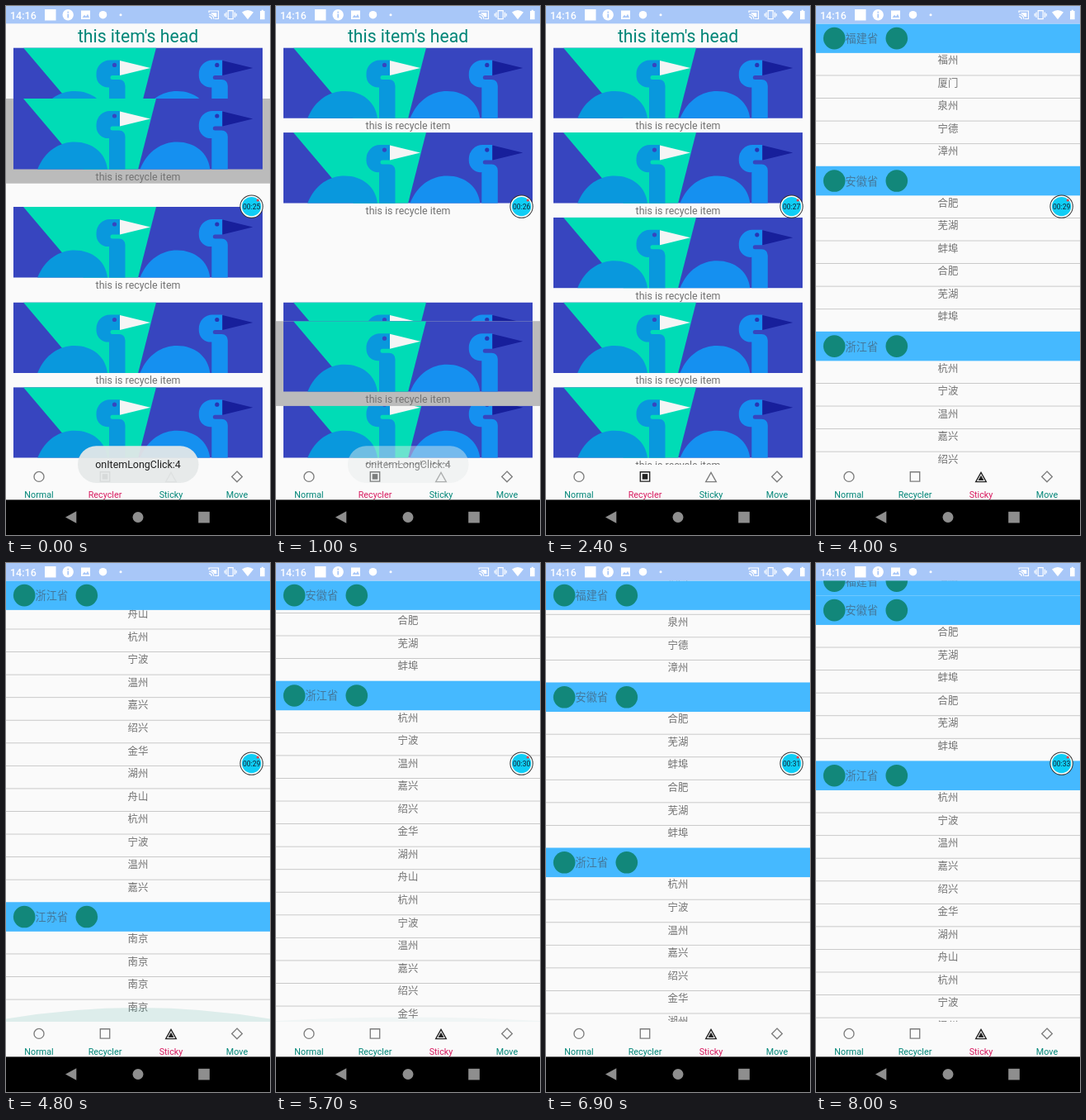
Animation of 320 by 640 pixels, one loop 8.1 s. Source, as an HTML page with a canvas:

```html
<!DOCTYPE html>
<html lang="en">
<head>
<meta charset="utf-8">
<style>
  html, body { margin: 0; width: 100%; height: 100%; overflow: hidden; background: #fafafa; }
  canvas { display: block; width: 320px; height: 640px; }
</style>
</head>
<body>
<canvas id="stage"></canvas>
<script>
const LOOP = 8100, SWITCH = 3200;
const TOP = 21.3, BOTTOM = 555, HEADER = 35.56, ROW = 27.56, RULE = 0.89, SLOT = 102.7;
const TEAL = '#008577', PINK = '#d81b60', GREY = '#737373', PAPER = '#fafafa';

const canvas = document.getElementById('stage');
const c = canvas.getContext('2d');
const dpr = window.devicePixelRatio || 1;
canvas.width = 320 * dpr;
canvas.height = 640 * dpr;

const clamp = v => Math.max(0, Math.min(1, v));
const ease = v => (1 - Math.cos(Math.PI * clamp(v))) / 2;
const slotY = i => 50.4 + i * SLOT;

// Smooth curve through [time, value] points, flat at turning points.
function curve(points, t) {
  const n = points.length - 1;
  if (t <= points[0][0]) return points[0][1];
  if (t >= points[n][0]) return points[n][1];
  const i = points.findIndex(p => p[0] > t) - 1;
  const slope = k => (points[k + 1][1] - points[k][1]) / (points[k + 1][0] - points[k][0]);
  const tangent = k => {
    if (k === 0 || k === n) return 0;
    const a = slope(k - 1), b = slope(k);
    return a * b <= 0 ? 0 : 2 * a * b / (a + b);
  };
  const [t0, a] = points[i], [t1, b] = points[i + 1];
  const d = t1 - t0, u = (t - t0) / d, u2 = u * u, u3 = u2 * u;
  return a + (b - a) * (3 * u2 - 2 * u3)
    + d * (tangent(i) * (u3 - 2 * u2 + u) + tangent(i + 1) * (u3 - u2));
}

function box(x, y, w, h, color) {
  c.fillStyle = color;
  c.fillRect(x, y, w, h);
}

function disc(x, y, r, color) {
  c.fillStyle = color;
  c.beginPath();
  c.arc(x, y, r, 0, 7);
  c.fill();
}

function shape(path, color) {
  c.fillStyle = color;
  c.fill(new Path2D(path));
}

function line(path, color, width) {
  c.strokeStyle = color;
  c.lineWidth = width;
  c.stroke(new Path2D(path));
}

function text(str, x, y, size, color, align = 'center', weight = 400) {
  c.font = `${weight} ${size}px Roboto, "Noto Sans CJK SC", "Noto Sans CJK", sans-serif`;
  c.textAlign = align;
  c.fillStyle = color;
  c.fillText(str, x, y);
}

function clipped(x, y, w, h, draw) {
  c.save();
  c.beginPath();
  c.rect(x, y, w, h);
  c.clip();
  draw();
  c.restore();
}

// ---- Recycler page ----

function bird(color, beak, eye) {
  shape('M29 86C38 63 56 52.5 74 52.5C96 52.5 112 66 114 86Z', color);
  shape('M129 15H117A16.5 16.5 0 0 0 100.5 31.5V34A14 14 0 0 0 116 48V86H135.5V46Q135 38.5 128 38.5H120A2.5 2.5 0 0 1 120 33.5H129Z', color);
  shape('M129 15.5L166 24.5L129 33.5Z', beak);
  disc(122.5, 21, 2.6, eye);
}

function card(y, lifted) {
  if (lifted) box(0, y, 320, SLOT, '#bbb');
  clipped(9, y, 302, 85.4, () => {
    c.translate(9, y);
    box(0, 0, 302, 86, '#3745bf');
    shape('M12 0H173L151 86H85Z', '#00dcb6');
    bird('#0998dd', '#f5f5f5', '#3745bf');
    c.translate(124.3, 0);
    bird('#1590f0', '#171f9b', '#2836b4');
  });
  text('this is recycle item', 160, y + 98.7, 12.44, GREY);
}

const DRAG = [[0, 112], [150, 110], [350, 130], [660, 256], [1000, 381],
  [1400, 438], [1900, 441], [2250, slotY(3)]];

function recyclerPage(t) {
  text("this item's head", 160, 44.3, 21.2, TEAL);
  const second = t < 400
    ? 243 + (slotY(2) - 243) * ease(t / 120)
    : slotY(2) - SLOT * ease((t - 660) / 250);
  const third = slotY(3) - SLOT * ease((t - 1000) / 250);
  [slotY(0), second, third, slotY(4)].forEach(y => card(y, false));
  card(curve(DRAG, t), t < 2300);
}

// ---- Sticky page ----

const cycle = (names, n) => Array.from({ length: n }, (_, i) => names[i % names.length]);
const GROUPS = [
  ['福建省', cycle(['福州', '厦门', '泉州', '宁德', '漳州'], 5)],
  ['安徽省', cycle(['合肥', '芜湖', '蚌埠'], 6)],
  ['浙江省', cycle(['杭州', '宁波', '温州', '嘉兴', '绍兴', '金华', '湖州', '舟山'], 20)],
  ['江苏省', cycle(['南京'], 4)]
];
const SCROLL = [[4150, 0], [4400, 210], [4700, 569.4], [5080, 569.4], [5700, 251.5],
  [6250, 94], [6700, 40], [6900, 49.2], [7200, 118], [7500, 154.4]];
const GLOW = [[4620, 0], [4780, 17], [4850, 17], [5300, 10], [5700, 5.5], [5950, 0]];

function groupHeader(name, y) {
  box(0, y, 320, HEADER, '#45b9ff');
  disc(22.2, y + 17.8, 13.3, '#12877a');
  disc(97.8, y + 17.8, 13.3, '#12877a');
  text(name, 35.6, y + 22.8, 13.2, '#44789b', 'left');
}

function stickyPage(t) {
  let y = TOP - curve(SCROLL, t);
  const heads = [];
  for (const [name, rows] of GROUPS) {
    heads.push([name, y]);
    y += HEADER;
    rows.forEach((city, i) => {
      const top = y + i * ROW;
      text(city, 160, top + 13.3, 12.44, GREY);
      if (i > 0) box(0, top - RULE, 320, RULE, '#c4c4c4');
    });
    y += rows.length * ROW - RULE;
  }
  heads.forEach(([name, top], i) => {
    const next = i + 1 < heads.length ? heads[i + 1][1] : y;
    groupHeader(name, Math.min(Math.max(top, TOP), Math.max(top, next - HEADER)));
  });
  const h = curve(GLOW, t);
  if (h > 0) {
    const edge = BOTTOM - h * 0.2;
    shape(`M0 ${BOTTOM}V${edge}Q160 ${BOTTOM - h * 1.8} 320 ${edge}V${BOTTOM}Z`,
      `rgba(0,133,119,${0.007 * h})`);
  }
}

// ---- Surroundings ----

function statusBar() {
  const white = '#fff';
  box(0, 0, 320, TOP, '#a8c7f8');
  text('14:16', 5, 15.7, 12.5, white, 'left', 500);
  box(47, 4, 13.5, 13.5, white);
  disc(75.2, 10.7, 6.7, white);
  box(74.4, 9.6, 1.7, 4.8, '#a8c7f8');
  box(74.4, 6.7, 1.7, 1.7, '#a8c7f8');
  box(91, 5.5, 11, 10.5, white);
  shape('M92.5 14L95 10.7L97 12.8L99 9.8L101 14Z', '#a8c7f8');
  disc(117.5, 10.7, 4.8, white);
  disc(139, 10.8, 1.5, white);
  line('M246 8V6H257.5V15.5H253M246 10A6 6 0 0 1 252 16M246 12.8A3.2 3.2 0 0 1 249.2 16', white, 1.2);
  shape('M248.5 8.3H255.3V13.2H252.8A8 8 0 0 0 248.5 9Z', white);
  line('M269.2 5.7H275.2V15.7H269.2ZM267 7.5V14M277.4 7.5V14M265.2 9V12.5M279.2 9V12.5', white, 1.2);
  shape('M286 7.6Q293 2.6 300 7.6L293 16.2Z', white);
  shape('M308 6H309.7V4.8H311.9V6H313.6V16.2H308Z', white);
}

const TABS = [
  ['Normal', 'M46 569.4A6 6 0 1 1 34 569.4A6 6 0 1 1 46 569.4Z'],
  ['Recycler', 'M114.3 563.7H125.7V575.1H114.3Z', 'M116.7 566.1H123.3V572.7H116.7Z'],
  ['Sticky', 'M200 564.4L206.3 575.6H193.7Z', 'M200 567.8L203.5 574H196.5Z'],
  ['Move', 'M280 563.1L286.3 569.4L280 575.7L273.7 569.4Z']
];

function tabBar(t) {
  const selected = t < SWITCH ? 1 : 2;
  box(0, BOTTOM, 320, 43, PAPER);
  if (t > 3000 && t < 3600) {
    clipped(0, BOTTOM, 320, 43, () =>
      disc(200, 576, 12 + 30 * ease((t - 3000) / 300),
        `rgba(0,133,119,${0.1 * clamp((3600 - t) / 350)})`));
  }
  TABS.forEach(([name, outline, core], i) => {
    const on = i === selected;
    line(outline, on ? '#222' : '#7d7d7d', 1.35);
    if (on) shape(core, '#222');
    text(name, 40 + 80 * i, 594.8, 10.75, on ? PINK : TEAL);
  });
}

function navBar() {
  const tint = '#8e8e8e';
  box(0, 597.4, 320, 43, '#000');
  shape('M72 618.5L85.3 611.3V625.7Z', tint);
  disc(160, 618.5, 6.5, tint);
  box(233.2, 611.8, 13.6, 13.6, tint);
}

function toast(t) {
  c.globalAlpha = 0.93 * clamp((1150 - t) / 300);
  c.fillStyle = '#e6e9e9';
  c.beginPath();
  c.roundRect(87, 532.3, 146.5, 44.6, 22.3);
  c.fill();
  text('onItemLongClick:4', 160, 559.2, 12.44, '#111');
  c.globalAlpha = 1;
}

function recorder(t) {
  const x = 297.6, y = 242.6;
  disc(x, y, 14.2, '#333');
  disc(x, y, 13.2, '#fff');
  disc(x, y, 11.7, '#10cdf5');
  disc(x + 7.6, y - 7.6, 1.6, '#e8404a');
  text('00:' + (25 + Math.floor(t / 1000)), x, y + 3, 8.5, '#123');
}

function draw(t) {
  c.setTransform(dpr, 0, 0, dpr, 0, 0);
  box(0, 0, 320, 640, PAPER);
  clipped(0, TOP, 320, BOTTOM - TOP, () => (t < SWITCH ? recyclerPage : stickyPage)(t));
  statusBar();
  tabBar(t);
  navBar();
  if (t < 1150) toast(t);
  recorder(t);
}

const start = performance.now();
function tick() {
  draw((performance.now() - start) % LOOP);
  requestAnimationFrame(tick);
}
tick();
</script>
</body>
</html>
```
